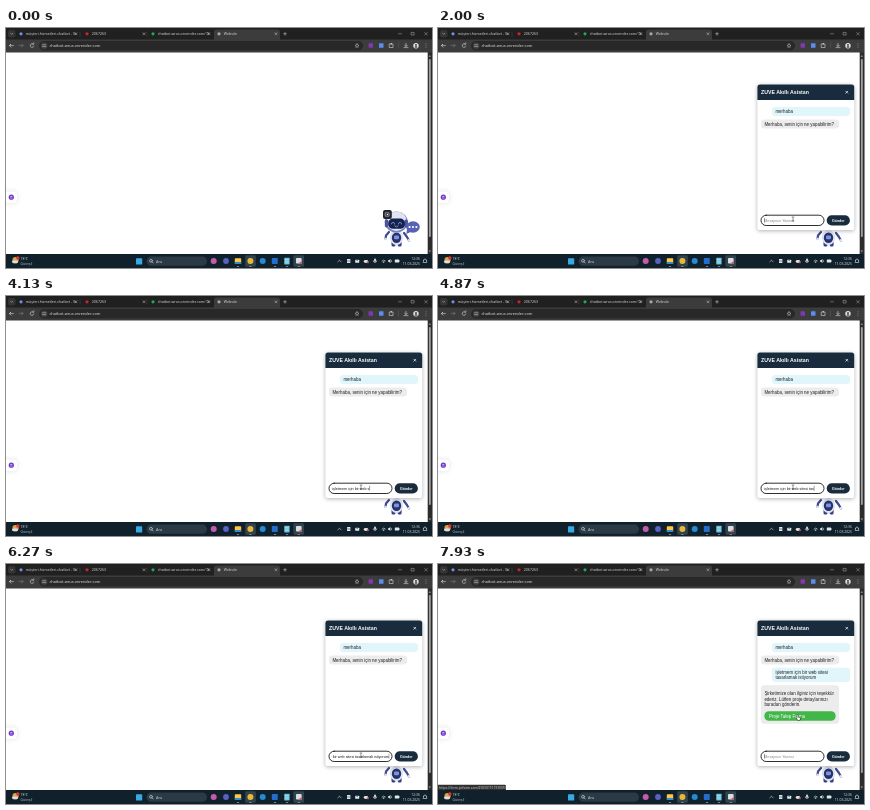
An HTML page with a canvas for the animation above (8 s loop, 426 px wide and 240 px high).

```html
<!DOCTYPE html>
<html lang="tr">
<head>
<meta charset="utf-8">
<title>Chat assistant</title>
<style>
html, body { margin: 0; width: 100%; height: 100%; overflow: hidden; background: #fff; }
canvas { display: block; width: 426px; height: 240px; }
</style>
</head>
<body>
<canvas id="stage"></canvas>
<script>
const W = 426, H = 240, LOOP = 8000;
const canvas = document.getElementById('stage');
const dpr = window.devicePixelRatio || 1;
canvas.width = W * dpr;
canvas.height = H * dpr;
const c = canvas.getContext('2d');
c.scale(dpr, dpr);

const SANS = '"Liberation Sans", Arial, sans-serif';
const UI = '"Open Sans", "Noto Sans", sans-serif';
const NAVY = '#182c3d';
const GREETING = 'merhaba';
const REQUEST = 'işletmem için bir web sitesi tasarlamak istiyorum';

// Times of the conversation, in ms
const T = {
  open: 300, greet: 760, sent1: 1470, reply1: 1800,
  ask: 2330, sent2: 6350, reply2: 7130, move: 7300, hover: 7700
};

function box(x, y, w, h, fill, r = 0) {
  c.fillStyle = fill;
  c.beginPath();
  c.roundRect(x, y, w, h, r);
  c.fill();
}

function oval(x, y, rx, ry, fill) {
  c.fillStyle = fill;
  c.beginPath();
  c.ellipse(x, y, rx, ry, 0, 0, Math.PI * 2);
  c.fill();
}

const dot = (x, y, r, fill) => oval(x, y, r, r, fill);

function line(points, color, width = 0.6) {
  c.strokeStyle = color;
  c.lineWidth = width;
  c.lineCap = c.lineJoin = 'round';
  c.beginPath();
  points.forEach(([x, y], i) => i ? c.lineTo(x, y) : c.moveTo(x, y));
  c.stroke();
}

function ring(x, y, r, color, from = 0, to = Math.PI * 2) {
  c.strokeStyle = color;
  c.lineWidth = 0.6;
  c.beginPath();
  c.arc(x, y, r, from, to);
  c.stroke();
}

function shape(points, fill) {
  c.fillStyle = fill;
  c.beginPath();
  points.forEach(([x, y]) => c.lineTo(x, y));
  c.fill();
}

function text(str, x, y, size, fill, { font = SANS, bold = false, align = 'left' } = {}) {
  c.font = `${bold ? 'bold ' : ''}${size}px ${font}`;
  c.textAlign = align;
  c.fillStyle = fill;
  c.fillText(str, x, y);
}

function cross(x, y, r, color, width = 0.5) {
  line([[x - r, y - r], [x + r, y + r]], color, width);
  line([[x + r, y - r], [x - r, y + r]], color, width);
}

function glass(x, y, color) {
  ring(x, y, 1.4, color);
  line([[x + 1, y + 1], [x + 2.2, y + 2.2]], color);
}

function browser() {
  const light = '#d5d5d5';
  box(0, 0, W, 12, '#202020');
  box(208, 1.5, 66, 12, '#3c3c3c', 2.5);
  box(2, 2, 7.5, 7.5, '#353535', 2);
  line([[4.6, 5.3], [5.7, 6.4], [6.8, 5.3]], light, 0.5);

  const tabs = [
    [13, '#6f8fe8', 'müşteri-hizmetleri-chatbot - Si', 69],
    [79, '#c9232d', '2067263', 137],
    [145, '#20a85a', 'chatbot-wrus.onrender.com/ D', 202],
    [211, '#a9a9a9', 'Website', 269]
  ];
  for (const [x, color, label, end] of tabs) {
    dot(x + 2, 5.8, 1.6, color);
    text(label, x + 6.8, 7.2, 3.55, '#dedede', { font: UI });
    cross(end + 1, 5.8, 1, light);
  }
  line([[74, 3.5], [74, 8.5]], '#555', 0.4);
  line([[141, 3.5], [141, 8.5]], '#555', 0.4);
  line([[277.5, 5.8], [280.5, 5.8]], light, 0.5);
  line([[279, 4.3], [279, 7.3]], light, 0.5);
  line([[392.5, 5.8], [395.5, 5.8]], light, 0.4);
  c.strokeRect(405.5, 4.4, 2.6, 2.6);
  cross(420, 5.8, 1.3, light, 0.4);

  box(0, 11.5, W, 13, '#3c3c3c');
  box(33, 13, 324, 9.5, '#282828', 5);
  line([[7.5, 17.6], [3.5, 17.6], [5, 16], [3.5, 17.6], [5, 19.2]], light, 0.6);
  line([[13, 17.6], [17, 17.6], [15.5, 16], [17, 17.6], [15.5, 19.2]], '#777', 0.6);
  ring(26, 17.6, 1.8, light, 0.3, 5.5);
  line([[26.4, 16], [27.9, 16.1], [27.8, 14.7]], light, 0.5);
  dot(38.2, 17.7, 3.2, '#414141');
  line([[36.6, 16.8], [39.8, 16.8]], light, 0.5);
  line([[36.6, 18.6], [39.8, 18.6]], light, 0.5);
  text('chatbot-wrus.onrender.com', 43.5, 19.1, 3.9, '#e8e8e8', { font: UI });

  const star = Array.from({ length: 11 }, (_, i) => {
    const a = i * Math.PI / 5 - Math.PI / 2, r = i % 2 ? 0.9 : 2.1;
    return [351 + r * Math.cos(a), 17.8 + r * Math.sin(a)];
  });
  line(star, light, 0.45);
  box(362.5, 15.3, 4.5, 4.5, '#8038ad', 0.8);
  box(373, 15.3, 4.5, 4.5, '#5a8eec', 0.5);
  c.strokeStyle = light;
  c.lineWidth = 0.6;
  c.strokeRect(383.6, 16, 3.4, 3.5);
  dot(385.3, 15.8, 0.8, light);
  line([[392.5, 15], [392.5, 20]], '#666', 0.4);
  line([[400, 15.3], [400, 18.4]], light);
  line([[398.6, 17.2], [400, 18.6], [401.4, 17.2]], light);
  line([[398, 19.6], [402, 19.6]], light);
  dot(410, 17.7, 2.7, '#e4e4e4');
  dot(410, 17, 0.9, '#333');
  oval(410, 19, 1.5, 0.8, '#333');
  [-1.8, 0, 1.8].forEach(d => dot(420, 17.6 + d, 0.4, light));
}

function page() {
  box(0, 24, W, 203, '#fff');
  box(421.7, 24, 4.3, 203, '#2c2c2c');
  shape([[422.7, 28.8], [425, 28.8], [423.85, 27]], '#a0a0a0');
  box(422.9, 31, 1.9, 178, '#9f9f9f', 1);
  shape([[422.7, 222.5], [425, 222.5], [423.85, 224.3]], '#a0a0a0');

  c.save();
  c.shadowColor = 'rgba(60,40,90,.16)';
  c.shadowBlur = 5 * dpr;
  box(-3, 163.5, 14, 11.5, '#fff', 4);
  c.restore();
  dot(5.3, 169.2, 2.6, '#7435d2');
  box(4.2, 168.3, 2.2, 0.6, '#eee4ff');
  box(4.2, 169.7, 2.2, 0.6, '#eee4ff');
}

function robot(hovered) {
  const blue = '#343f86', pale = '#dfe3f2';
  line([[383, 204], [380, 207.5], [379.5, 211]], '#404b93', 2.2);
  line([[398, 205], [401, 209], [403, 212.5]], '#404b93', 2.2);
  dot(379.7, 211, 1.3, pale);
  dot(402.8, 212.4, 1.3, pale);
  box(385.5, 213, 4, 5.5, blue, 1.6);
  box(391.6, 213, 4, 5.5, blue, 1.6);
  oval(390.5, 209.5, 6.6, 7.4, pale);
  oval(390.5, 209.8, 4.7, 5.2, '#28336d');
  box(388, 207.6, 5, 3.6, '#7994e0', 1.2);

  if (!hovered) return;
  oval(390.3, 194, 11.4, 10.5, '#7580bd');
  oval(390.5, 193.2, 10.2, 9.7, pale);
  box(378.8, 191.5, 3.6, 8, '#48549f', 1.8);
  box(398.3, 191.5, 3.6, 8, '#48549f', 1.8);
  box(382.3, 190.6, 16.6, 10.2, '#17204f', 4.5);
  for (const x of [387, 394]) {
    ring(x, 196, 1.6, '#8edcff', Math.PI, Math.PI * 2);
  }
  ring(390.5, 197.2, 1.7, '#8edcff', 0.3, Math.PI - 0.3);
  oval(407, 199, 6.8, 5.7, '#5662b4');
  shape([[401, 201], [400.4, 206], [405, 203.8]], '#5662b4');
  [403.6, 407, 410.4].forEach(x => dot(x, 199, 1.1, '#fff'));
  box(377, 182, 8.8, 9, '#20252c', 2);
  c.strokeStyle = '#f0f0f0';
  c.lineWidth = 0.5;
  c.strokeRect(379.6, 184.8, 3.5, 3.4);
  dot(381.4, 186.5, 0.8, '#f0f0f0');
}

function taskbar() {
  const light = '#e2e7ea';
  box(0, 226, W, 14, '#10212c');
  dot(9.5, 232.2, 3.1, '#e4a044');
  oval(9, 233.7, 3, 1.5, '#d8dee3');
  dot(11.8, 230, 1.7, '#d93a36');
  text('18°C', 14.5, 232, 3.4, light, { font: UI });
  text('Güneşli', 14.5, 236.6, 3.4, '#b9c3c9', { font: UI });
  box(130, 230.2, 6.2, 6.2, '#37a9e5', 0.5);
  box(140.5, 228.6, 60.5, 9.2, '#2b3a44', 4.6);
  glass(145, 232.8, light);
  text('Ara', 150, 234.7, 3.8, '#d3dade', { font: UI });

  dot(207.7, 233, 3, '#c65bad');
  dot(220, 233, 2.9, '#5961c5');
  box(228.8, 230.3, 6.4, 5.6, '#ffc748', 0.7);
  box(228.8, 233.9, 6.4, 2, '#3388ce', 0.4);
  box(239.2, 227.2, 10.6, 11.5, '#33434e', 1.3);
  dot(244.4, 233, 3, '#e6ba36');
  dot(256.7, 233, 3, '#248bd5');
  box(265.8, 230, 6, 6, '#256dcc', 0.7);
  box(278.2, 229.7, 5.4, 6.7, '#65bdd7', 0.6);
  [231.6, 233.2, 234.8].forEach(y => line([[279.4, y], [282.4, y]], '#edfbff', 0.45));
  box(287.4, 227.2, 10.6, 11.5, '#33434e', 1.3);
  box(290, 230, 5.6, 5.6, '#d7dde3', 0.8);
  dot(294.7, 235, 1.3, '#d55965');
  [232, 244.4, 269, 281, 292.8].forEach(x => box(x - 1.2, 238.2, 2.4, 0.7, '#99a4aa', 0.3));

  line([[331.9, 233.8], [333.5, 232.2], [335.1, 233.8]], light);
  box(341, 231, 3.4, 4, light, 0.5);
  line([[341.3, 233], [344.1, 233]], '#10212c', 0.5);
  box(349.2, 231.8, 4, 3, light, 0.4);
  line([[350.1, 231.5], [351.2, 233], [352.3, 231.5]], '#10212c', 0.4);
  oval(360, 233.5, 2.4, 1.4, light);
  dot(361.8, 234.3, 1.1, '#d84a40');
  box(368.2, 230.6, 1.7, 3.3, light, 0.8);
  ring(369, 232.8, 1.7, light, 0, Math.PI);
  for (const r of [1.1, 2.3]) ring(377.7, 234.5, r, light, -2.4, -0.75);
  dot(377.7, 234.6, 0.5, light);
  shape([[382, 232.2], [383, 232.2], [384.4, 231], [384.4, 235], [383, 233.8], [382, 233.8]], light);
  ring(384.5, 233, 1.2, light, -1, 1);
  box(388.8, 231.5, 4.3, 3, light, 0.5);
  box(393.1, 232.3, 0.5, 1.4, light);
  text('12:36', 414, 232, 3.4, light, { font: UI, align: 'right' });
  text('11.03.2025', 414, 236.8, 3.4, light, { font: UI, align: 'right' });
  ring(419, 232.5, 1.5, light, Math.PI, Math.PI * 2);
  line([[417.5, 232.5], [417.2, 234.5], [420.8, 234.5], [420.5, 232.5]], light);
}

function bubble(x, y, w, h, lines, mine) {
  box(x, y, w, h, mine ? '#e0f6fb' : '#ececec', 3.3);
  lines.forEach((s, i) => text(s, x + 3.4, y + 6 + i * 5.1, 4.44, '#202020'));
}

// Text standing in the entry field at time t
function draft(t) {
  const typed = (str, start, step) => str.slice(0, Math.max(0, Math.floor((t - start) / step)));
  if (t < T.reply1) return typed(GREETING, T.greet - 75, 80);
  if (t < T.reply2) return typed(REQUEST, T.ask, 78);
  return '';
}

function entry(t) {
  box(323, 187.2, 63, 10.3, '#fff', 5.1);
  c.strokeStyle = '#15191d';
  c.lineWidth = 0.9;
  c.stroke();
  const str = draft(t);
  c.save();
  c.beginPath();
  c.rect(325.8, 188, 57.8, 9);
  c.clip();
  c.font = `3.7px ${SANS}`;
  const width = c.measureText(str).width;
  const x = 326.3 - Math.max(0, width - 56.6);
  text(str || 'Mesajınızı Yazınız', x, 193.6, 3.7, str ? '#151515' : '#858585');
  line([[x + width + 0.2, 190.1], [x + width + 0.2, 194.4]], '#151515', 0.4);
  c.restore();
  box(388.7, 187.2, 23.2, 10.3, NAVY, 5.1);
  text('Gönder', 400.3, 193.6, 3.55, '#fff', { bold: true, align: 'center' });
}

function chat(t) {
  c.save();
  c.shadowColor = 'rgba(0,0,0,.3)';
  c.shadowBlur = 4 * dpr;
  c.shadowOffsetY = dpr;
  box(319.4, 56.6, 96.8, 145.4, '#fff', 2.6);
  c.restore();
  box(319.4, 56.6, 96.8, 15.5, NAVY, [2.6, 2.6, 0, 0]);
  text('ZUVE Akıllı Asistan', 323, 66, 5.2, '#fff', { bold: true });
  cross(408.8, 64.2, 1, '#fff', 0.7);

  if (t >= T.sent1) bubble(334, 79, 78, 9, [GREETING], true);
  if (t >= T.reply1) bubble(323, 91.5, 78, 9, ['Merhaba, senin için ne yapabilirim?']);
  else if (t >= T.sent1) waiting(91.5);
  if (t >= T.sent2) {
    bubble(334, 103.7, 78, 14.3, ['işletmem için bir web sitesi', 'tasarlamak istiyorum'], true);
  }
  if (t >= T.reply2) {
    bubble(323, 121.2, 78, 38.6, []);
    ['Şirketimize olan ilginiz için teşekkür', 'ederiz. Lütfen proje detaylarınızı', 'buradan gönderin.']
      .forEach((s, i) => text(s, 326.4, 131.4 + i * 5.15, 4.44, '#202020'));
    box(326.4, 147.2, 71.2, 9.6, t >= T.hover ? '#43b649' : '#4caf50', 4.4);
    text('Proje Talep Formu', 331, 153.6, 4.44, '#fff');
  } else if (t >= T.sent2) waiting(124);
  entry(t);
}

function waiting(y) {
  box(323, y, 18, 10.2, '#ececec', 3.3);
  text('... ...', 326.5, y + 6, 5.4, '#202020');
}

function pointer(t) {
  const ease = (a, b) => {
    const p = Math.min(1, Math.max(0, (t - a) / (b - a)));
    return p * p * (3 - 2 * p);
  };
  if (t < T.open) return;
  const come = ease(T.open, 600), go = ease(T.move, T.hover);
  const x = 391 - 36 * come + 5.5 * go;
  const y = 200 - 9 * come - 38.5 * go;
  if (t >= T.hover) {
    line([[x - 0.8, y + 2.8], [x - 0.8, y - 1.2]], '#333', 1.6);
    box(x - 1.7, y + 0.5, 3.8, 3.4, '#333', 1.2);
    line([[x - 0.8, y + 2.5], [x - 0.8, y - 1.2]], '#fff', 0.8);
    box(x - 1.2, y + 1, 2.8, 2.4, '#fff', 0.8);
  } else if (come === 1 && go < 0.15) {
    line([[x, y - 1.8], [x, y + 1.8]], '#222', 0.5);
    for (const d of [-2, 2]) line([[x - 0.9, y + d], [x + 0.9, y + d]], '#222', 0.4);
  } else {
    shape([[x, y], [x, y + 4.4], [x + 1.1, y + 3.4], [x + 1.8, y + 4.8],
      [x + 2.4, y + 4.5], [x + 1.8, y + 3.2], [x + 3.2, y + 3.1]], '#222');
  }
}

function status() {
  box(0, 220.8, 68, 5.2, '#303030', [0, 1.2, 0, 0]);
  text('https://form.jotform.com/250501157330059', 1.3, 224.6, 3.25, '#d8d8d8', { font: UI });
}

function draw(t) {
  page();
  browser();
  robot(t < T.open);
  if (t >= T.open) chat(t);
  taskbar();
  if (t >= T.hover) status();
  pointer(t);
}

const start = performance.now();
function tick() {
  draw((performance.now() - start) % LOOP);
  requestAnimationFrame(tick);
}
tick();
</script>
</body>
</html>
```
